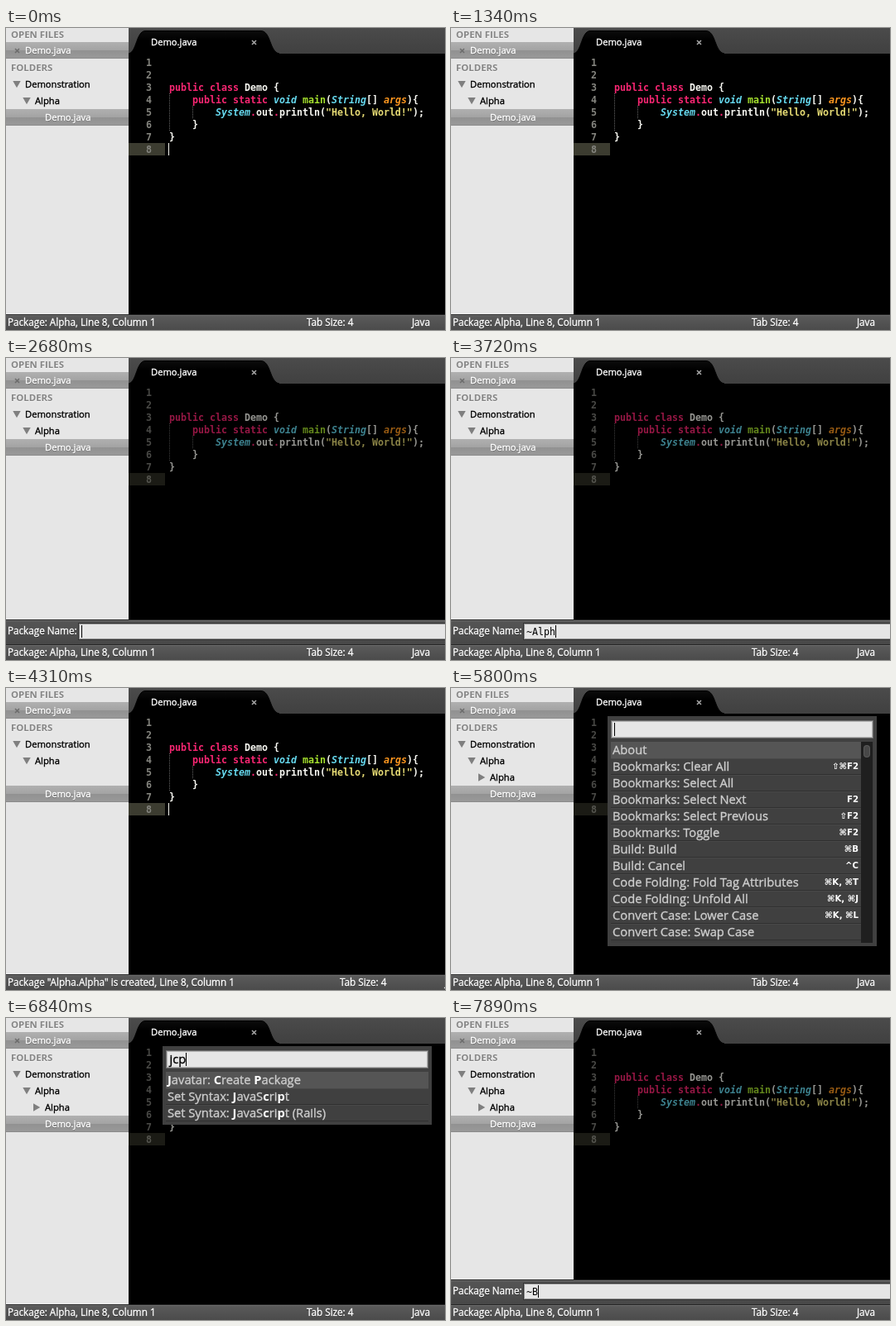
Recreate the animation shown at these times as an HTML page with a canvas. Size 530 by 365 pixels, loop 8000 ms.

```html
<!DOCTYPE html>
<html lang="en">
<head>
<meta charset="utf-8">
<title>Editor command palette</title>
<style>
  html, body { margin: 0; width: 530px; height: 365px; overflow: hidden; background: #000; }
  canvas { display: block; }
</style>
</head>
<body>
<canvas id="stage" width="530" height="365"></canvas>
<script>
const ctx = document.getElementById('stage').getContext('2d');
const LOOP = 8000;
const SANS = '"Open Sans", sans-serif';
const MONO = '"DejaVu Sans Mono", monospace';
const UI = `11.2px ${SANS}`;
const STATUS = `11.7px ${SANS}`;
const HEADING = `bold 11.4px ${SANS}`;
const ROW = `14.7px ${SANS}`;
const KEYS = 'bold 10.2px "DejaVu Sans", sans-serif';
const CODE_SIZE = 11.627; // gives a 7px advance
const CELL = 7;

const PINK = '#f92672', BLUE = '#66d9ef', GREEN = '#a6e22e';
const ORANGE = '#fd971f', YELLOW = '#e6db74', WHITE = '#f8f8f2';

// line, column, text, colour, italic
const CODE = [
  [3, 0, 'public', PINK], [3, 7, 'class', PINK], [3, 13, 'Demo {', WHITE],
  [4, 4, 'public', PINK], [4, 11, 'static', PINK], [4, 18, 'void', BLUE, true],
  [4, 23, 'main', GREEN], [4, 27, '(', WHITE], [4, 28, 'String', BLUE, true],
  [4, 34, '[]', WHITE], [4, 37, 'args', ORANGE, true], [4, 41, '){', WHITE],
  [5, 8, 'System', BLUE, true], [5, 14, '.', PINK], [5, 15, 'out', WHITE],
  [5, 18, '.', PINK], [5, 19, 'println(', WHITE], [5, 27, '"Hello, World!"', YELLOW],
  [5, 42, ');', WHITE], [6, 4, '}', WHITE], [7, 0, '}', WHITE]
];

const ALL = [
  ['About'], ['Bookmarks: Clear All', '⇧⌘F2'], ['Bookmarks: Select All'],
  ['Bookmarks: Select Next', 'F2'], ['Bookmarks: Select Previous', '⇧F2'],
  ['Bookmarks: Toggle', '⌘F2'], ['Build: Build', '⌘B'], ['Build: Cancel', '^C'],
  ['Code Folding: Fold Tag Attributes', '⌘K, ⌘T'],
  ['Code Folding: Unfold All', '⌘K, ⌘J'],
  ['Convert Case: Lower Case', '⌘K, ⌘L'], ['Convert Case: Swap Case']
];
const JAVATAR = [
  ['Javatar: Create Class'], ['Javatar: Create Enumerator'],
  ['Javatar: Create Interface'], ['Javatar: Create Package'],
  ['Javatar: Call...', '⇧⌘K, ⇧⌘J'], ['Javatar: Create new...', '⇧⌘K, ⇧⌘L']
];
const syntax = names => names.map(name => ['Set Syntax: ' + name]);
const LISTS = {
  '': { rows: ALL, thumb: 15 },
  j: {
    rows: [...JAVATAR, ...syntax(['Java', 'Java Server Pages (JSP)', 'JavaDoc',
      'JavaProperties', 'JavaScript', 'JavaScript (Rails)'])],
    thumb: 75
  },
  jc: {
    rows: [...JAVATAR, ['Snippet: import junit.framework.TestCase;', 'i'],
      ...syntax(['Objective-C', 'Objective-C++', 'JavaScript', 'JavaDoc', 'JavaScript (Rails)'])],
    thumb: 167
  },
  jcp: { rows: [JAVATAR[3], ...syntax(['JavaScript', 'JavaScript (Rails)'])] }
};

// Each step overrides part of the running state.
const STEPS = [
  [0, { caret: 1, tree: 0, created: false, query: null, name: null, selected: 0 }],
  [150, { caret: .5 }], [300, { caret: 0 }], [750, { caret: .5 }], [890, { caret: 1 }],
  [1190, { caret: .5 }], [1340, { caret: 0 }],
  [1490, { query: '' }], [1780, { query: 'j' }],
  [1930, { query: 'jc', selected: 1 }], [2230, { query: 'jcp', selected: 0 }],
  [2680, { query: null, name: '' }], [2980, { name: '~' }], [3120, { name: '~A' }],
  [3420, { name: '~Al' }], [3570, { name: '~Alp' }], [3720, { name: '~Alph' }],
  [4010, { name: '~Alpha' }],
  [4160, { name: null, caret: 1, created: true }], [4310, { tree: 1 }],
  [4460, { tree: 2, caret: .5 }], [4610, { caret: 0 }],
  [5060, { caret: .5 }], [5200, { caret: 1 }], [5500, { caret: .5 }], [5650, { caret: 0 }],
  [5800, { query: '', created: false }], [6240, { query: 'j' }], [6540, { query: 'jc' }],
  [6840, { query: 'jcp' }], [7140, { query: null, name: '' }],
  [7590, { name: '~' }], [7890, { name: '~B' }]
];

function stateAt(time) {
  const state = {};
  for (const [start, change] of STEPS) if (start <= time) Object.assign(state, change);
  return state;
}

function box(x, y, w, h, fill) {
  ctx.fillStyle = fill;
  ctx.fillRect(x, y, w, h);
}

function shade(y, h, ...colors) {
  const gradient = ctx.createLinearGradient(0, y, 0, y + h);
  colors.forEach((color, i) => gradient.addColorStop(i / (colors.length - 1), color));
  return gradient;
}

function text(value, x, y, font, color, align = 'left') {
  ctx.font = font;
  ctx.fillStyle = color;
  ctx.textAlign = align;
  ctx.fillText(value, x, y);
}

// Regular text thickened slightly, like smoothed desktop lettering.
function medium(value, x, y, font, color) {
  text(value, x, y, font, color);
  ctx.strokeStyle = color;
  ctx.lineWidth = .35;
  ctx.strokeText(value, x, y);
}

function shadowed(value, x, y, font, color, shadow, paint = medium) {
  text(value, x, y + 1, font, shadow);
  paint(value, x, y, font, color);
}

function cross(x, y, color) {
  ctx.strokeStyle = color;
  ctx.lineWidth = 1.6;
  ctx.beginPath();
  ctx.moveTo(x - 2.5, y - 2.5); ctx.lineTo(x + 2.5, y + 2.5);
  ctx.moveTo(x + 2.5, y - 2.5); ctx.lineTo(x - 2.5, y + 2.5);
  ctx.stroke();
}

function arrow(x, y, open) {
  ctx.save();
  ctx.translate(x, y);
  if (!open) ctx.rotate(-Math.PI / 2);
  ctx.fillStyle = '#7f7f7f';
  ctx.beginPath();
  ctx.moveTo(-4.7, -4); ctx.lineTo(4.7, -4); ctx.lineTo(0, 4.2);
  ctx.fill();
  ctx.restore();
}

function fileRow(y, x) {
  box(0, y, 148, 20, '#8b8b8b');
  box(0, y, 148, 10, shade(y, 10, '#b0b0b0', '#a3a3a3'));
  box(0, y + 10, 148, 9, shade(y + 10, 9, '#919191', '#999999'));
  shadowed('Demo.java', x, y + 14, UI, '#fff', 'rgba(0,0,0,.3)');
}

function folder(name, x, y, open) {
  arrow(x, y, open);
  medium(name, x + 10, y + 4, UI, '#000');
}

function drawSidebar(tree) {
  const heading = (label, y) => shadowed(label, 6, y, HEADING, '#858585', '#f6f6f6', text);
  box(0, 0, 148, 346, '#e6e6e6');
  heading('OPEN FILES', 12);
  fileRow(17, 23);
  cross(13.5, 27.5, '#6c6c6c');
  heading('FOLDERS', 52);
  folder('Demonstration', 13, 68, true);
  folder('Alpha', 25, 88, true);
  if (tree === 2) folder('Alpha', 37, 108, false);
  fileRow(tree ? 118 : 98, 47);
}

function drawTab() {
  box(148, 0, 382, 31, shade(0, 31, '#4b4b4b', '#404040'));
  ctx.beginPath();
  ctx.moveTo(148, 31);
  ctx.bezierCurveTo(158, 29, 157, 4, 168, 3.5);
  ctx.lineTo(308, 3.5);
  ctx.bezierCurveTo(320, 4, 318, 29, 330, 31);
  ctx.fillStyle = shade(3, 12, '#0c0c0c', '#000');
  ctx.fill();
  ctx.strokeStyle = '#000';
  ctx.lineWidth = 1;
  ctx.stroke();
  box(148, 31, 382, 3, '#000');
  medium('Demo.java', 175, 21, UI, '#fff');
  cross(299.5, 17.5, '#a5a5a5');
}

function guide(x, top, bottom) {
  for (let y = top; y < bottom; y += 2) box(x, y, 1, 1, '#666');
}

function drawCode(dimmed, caret) {
  box(148, 34, 382, 312, '#000');
  ctx.globalAlpha = dimmed ? .45 : 1;
  box(148, 139, 44, 15, '#3c3c30');
  ctx.globalAlpha = dimmed ? .55 : 1;
  for (let line = 1; line <= 8; line++) {
    text(line, 169, 31 + line * 15, `bold ${CODE_SIZE}px ${MONO}`, '#85857f');
  }
  ctx.globalAlpha = dimmed ? .6 : 1;
  guide(197, 79, 124);
  guide(225, 94, 109);
  for (const [line, column, value, color, italic] of CODE) {
    const font = `${italic ? 'italic ' : ''}bold ${CODE_SIZE}px ${MONO}`;
    text(value, 197 + column * CELL, 31 + line * 15, font, color);
  }
  ctx.globalAlpha = 1;
  if (!dimmed && caret) box(196, 139, 1, 15, `rgba(248,248,240,${caret})`);
}

function drawStatus(created) {
  box(0, 346, 530, 19, shade(346, 19, '#5c5c5c', '#4b4b4b'));
  box(0, 346, 530, 1, '#262626');
  box(0, 347, 530, 1, '#6b6b6b');
  const label = created ? 'Package "Alpha.Alpha" is created' : 'Package: Alpha';
  const shift = created ? 40 : 0;
  const put = (value, x) => shadowed(value, x, 360, STATUS, '#fff', '#222');
  put(label + ', Line 8, Column 1', 2);
  put('Tab Size: 4', 363 + shift);
  put('Java', 490 + shift);
}

// Capitals win over the first plain match.
function matches(label, query) {
  const hits = new Set();
  let from = 0;
  for (const letter of query) {
    let at = label.indexOf(letter.toUpperCase(), from);
    if (at < 0) at = label.indexOf(letter, from);
    hits.add(at);
    from = at + 1;
  }
  return hits;
}

function drawLabel(label, query, x, y) {
  const hits = matches(label, query);
  let run = '';
  const flush = (paint, font, color) => {
    paint(run, x, y, font, color);
    x += ctx.measureText(run).width;
    run = '';
  };
  [...label].forEach((char, i) => {
    if (hits.has(i)) {
      flush(medium, ROW, '#cecece');
      run = char;
      flush(text, 'bold ' + ROW, '#fff');
    } else run += char;
  });
  flush(medium, ROW, '#cecece');
}

function pill(x, y, w, h, fill) {
  ctx.beginPath();
  ctx.roundRect(x, y, w, h, 4);
  ctx.fillStyle = fill;
  ctx.fill();
}

function drawPalette({ query, selected }) {
  const { rows, thumb } = LISTS[query];
  const listHeight = thumb ? 243 : rows.length * 20;
  const width = thumb ? 302 : 317;
  box(189, 34, 325, listHeight + 35, '#404040');
  box(193, 39, 317, 22, '#6e6e6e');
  box(194, 40, 315, 20, '#b4b4b4');
  box(195, 41, 313, 18, '#e6e6e6');
  medium(query, 197.5, 55, ROW, '#000');
  box(Math.round(197 + ctx.measureText(query).width), 42, 1, 16, '#000');

  box(193, 65, 317, listHeight, '#3d3d3d');
  rows.forEach(([label, keys], i) => {
    const y = 65 + i * 20;
    if (i === selected) {
      box(193, y, width, 20, '#555');
    } else {
      box(193, y, width, 20, '#404040');
      box(193, y, width, 1, '#484848');
      box(193, y + 19, width, 1, '#303030');
    }
    drawLabel(label, query, 195, y + 15);
    if (keys) text(keys, 492, y + 13, KEYS, '#fff', 'right');
  });
  if (thumb) {
    box(495, 65, 14, 243, '#1f1f1f');
    pill(498, 69, 8, thumb, '#5a5a5a');
    pill(499, 70, 6, thumb - 2, '#484848');
  }
}

function drawPrompt(name) {
  box(0, 316, 530, 30, shade(316, 30, '#565656', '#484848'));
  box(0, 316, 530, 1, '#262626');
  box(0, 317, 530, 1, '#6b6b6b');
  shadowed('Package Name:', 2, 334, STATUS, '#fff', '#222');
  box(87, 320, 443, 21, '#333');
  box(88, 321, 442, 19, '#929292');
  box(89, 322, 441, 17, '#e6e6e6');
  text(name, 91, 334.5, `${CODE_SIZE}px ${MONO}`, '#000');
  box(91 + name.length * CELL, 323, 1, 15, '#000');
}

function draw(now) {
  const state = stateAt(now % LOOP);
  const searching = state.query !== null;
  const naming = state.name !== null;
  drawCode(searching || naming, state.caret);
  drawTab();
  drawSidebar(state.tree);
  drawStatus(state.created);
  if (searching) drawPalette(state);
  if (naming) drawPrompt(state.name);
}

const start = performance.now();
function tick() {
  draw(performance.now() - start);
  requestAnimationFrame(tick);
}
tick();
</script>
</body>
</html>
```
